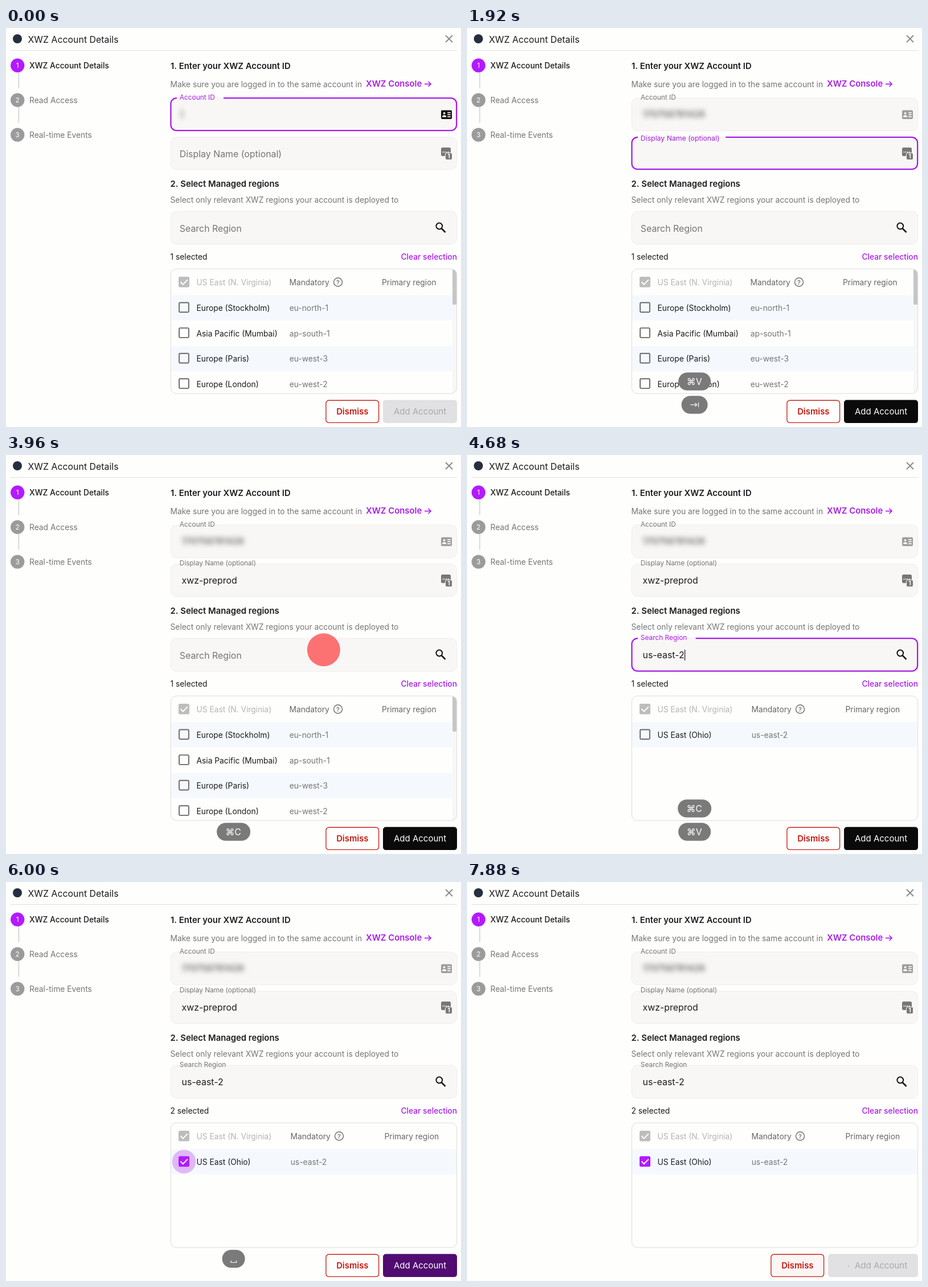
Recreate the animation shown at these times as an HTML page with a canvas. Size 799 by 701 pixels, loop 7920 ms.

```html
<!DOCTYPE html>
<html lang="en">
<head>
<meta charset="utf-8">
<title>Account details</title>
<style>
html, body { margin: 0; width: 100%; height: 100%; overflow: hidden; background: #fefefd; }
canvas { display: block; }
</style>
</head>
<body>
<canvas id="stage" width="799" height="701"></canvas>
<script>
const ctx = document.getElementById('stage').getContext('2d');
const LOOP = 7920;
const PURPLE = '#a81ce8', VIVID = '#b31aff', INK = '#1b1b1d', GREY = '#757575', FILL = '#f9f7f6';
const SMALL = 11.9, BODY = 13.8, HEAD = 14.85, INPUT = 15.9;

const clamp = v => Math.max(0, Math.min(1, v));
const ramp = (t, from, len) => clamp((t - from) / len);
const ease = p => p * p * (3 - 2 * p);
const within = (t, ...spans) => spans.some(([a, b]) => t >= a && t < b);
const mix = (a, b, p) => 'rgb(' + a.map((v, i) => Math.round(v + (b[i] - v) * p)) + ')';

// y is the middle of the capital letters
function text(str, x, y, size, color, weight = 400, align = 'left') {
  ctx.font = `${weight} ${size}px Inter, "DejaVu Sans", sans-serif`;
  ctx.textAlign = align;
  ctx.fillStyle = color;
  ctx.fillText(str, x, y + size * 0.364);
}

function box(x, y, w, h, r, fill, stroke, lw = 1) {
  ctx.beginPath();
  ctx.roundRect(x, y, w, h, r);
  if (fill) { ctx.fillStyle = fill; ctx.fill(); }
  if (stroke) { ctx.strokeStyle = stroke; ctx.lineWidth = lw; ctx.stroke(); }
}

function disc(x, y, r, fill) {
  ctx.beginPath();
  ctx.arc(x, y, r, 0, Math.PI * 2);
  ctx.fillStyle = fill;
  ctx.fill();
}

function line(color, lw, ...pts) {
  ctx.beginPath();
  pts.forEach(([x, y]) => ctx.lineTo(x, y));
  ctx.strokeStyle = color;
  ctx.lineWidth = lw;
  ctx.stroke();
}

function header() {
  disc(20, 19, 8, '#252f3e');
  text('XWZ Account Details', 38.5, 20, INPUT, INK);
  line('#8c8c8c', 1.9, [772, 13], [784, 25]);
  line('#8c8c8c', 1.9, [784, 13], [772, 25]);
  line('#e0e0e0', 1, [8, 39.5], [792, 39.5]);
}

function steps() {
  ['XWZ Account Details', 'Read Access', 'Real-time Events'].forEach((name, i) => {
    const y = 65.8 + i * 60.9;
    disc(20.2, y, 12.2, i ? '#9b9b9b' : VIVID);
    text(i + 1, 20.2, y, SMALL, '#fff', 400, 'center');
    text(name, 41, y + 0.2, BODY, i ? GREY : INK, i ? 400 : 500);
    if (i < 2) line('#bdbdbd', 1, [22.5, y + 12], [22.5, y + 40]);
  });
}

function headings() {
  text('1. Enter your XWZ Account ID', 289, 67, HEAD, INK, 600);
  text('Make sure you are logged in to the same account in', 288.5, 98.5, BODY, GREY);
  text('XWZ Console', 632, 98, HEAD, PURPLE, 600);
  line(PURPLE, 1.7, [735, 98.5], [746, 98.5]);
  line(PURPLE, 1.7, [741.5, 94], [746, 98.5], [741.5, 103]);
  text('2. Select Managed regions', 288.5, 273.5, HEAD, INK, 600);
  text('Select only relevant XWZ regions your account is deployed to', 288.5, 302, BODY, GREY);
}

function field(y, h, label, shrink, value, edge, lw, labelColor) {
  box(289.2, y + 0.5, 502.4, h - 1, 10, FILL, '#efedec');
  ctx.font = `400 ${SMALL}px Inter, sans-serif`;
  const gapEnd = 305 + ctx.measureText(label).width + 15;
  if (edge) {
    const l = 288.3 + lw / 2, r = 792.3 - lw / 2, top = y + 0.6, bot = y + h + 0.3 - lw / 2, c = 10;
    ctx.beginPath();
    ctx.moveTo(gapEnd, top);
    ctx.arcTo(r, top, r, bot, c);
    ctx.arcTo(r, bot, l, bot, c);
    ctx.arcTo(l, bot, l, top, c);
    ctx.arcTo(l, top, gapEnd, top, c);
    ctx.lineTo(300, top);
    ctx.strokeStyle = edge;
    ctx.lineWidth = lw;
    ctx.stroke();
  }
  const rest = y + h / 2 + 1;
  text(label, 304.8, rest + (y - 1.3 - rest) * shrink, INPUT + (SMALL - INPUT) * shrink, labelColor);
  if (value) text(value, 308.5, y + h / 2 + 0.5, INPUT, INK);
}

const caret = (x, y) => { ctx.fillStyle = INK; ctx.fillRect(x, y, 1.2, 19); };

function idIcon(color) {
  box(764, 144.5, 19, 15.5, 2, color);
  disc(769.6, 149.8, 1.9, '#fff');
  box(766, 153.2, 7.2, 3.2, [3, 3, 0, 0], '#fff');
  ctx.fillStyle = '#fff';
  for (const y of [147.8, 151.4, 155]) ctx.fillRect(775.2, y, 5.6, 1.7);
}

function nameIcon() {
  box(764, 210, 17, 15, 2.5, '#777');
  for (let i = 0; i < 4; i++) disc(767.5 + i * 3.2, 218, 1, '#fff');
  box(771.5, 219.5, 12, 12, 2.5, '#777', FILL);
  text('1', 777.6, 225.6, 10, '#fff', 700, 'center');
}

function loupe() {
  ctx.beginPath();
  ctx.arc(760.8, 348, 5.4, 0, Math.PI * 2);
  ctx.strokeStyle = '#111';
  ctx.lineWidth = 2;
  ctx.stroke();
  line('#111', 2.5, [764.6, 352], [771.5, 359]);
}

function secretId(t) {
  ctx.save();
  ctx.filter = 'blur(4px)';
  if (t >= 760) text('170758781426', 308.5, 151, INPUT, '#555', 500);
  ctx.fillStyle = '#777';
  if (within(t, [0, 120], [480, 760])) ctx.fillRect(308, 143, 2, 16);
  if (within(t, [760, 1120], [1440, 1760])) ctx.fillRect(418, 143, 2, 16);
  ctx.restore();
}

function fields(t) {
  const onId = t < 1760, onName = within(t, [1760, 3280]), onSearch = within(t, [4040, 4800]);
  field(122.5, 58.5, 'Account ID', 1, '', onId && PURPLE, 2.3, onId ? PURPLE : GREY);
  secretId(t);
  idIcon(onId ? '#111' : '#9d9d9d');

  field(191.3, 57.7, 'Display Name (optional)', ease(ramp(t, 1760, 200)),
    t >= 2560 && 'xwz-preprod', onName && PURPLE, 2.3, onName ? PURPLE : GREY);
  if (within(t, [1960, 2440])) caret(308.5, 211);
  if (within(t, [2560, 2920])) caret(405, 211);
  nameIcon();

  const hover = within(t, [4800, 5760]);
  field(321.5, 59, 'Search Region', ease(ramp(t, 4040, 200)), t >= 4680 && 'us-east-2',
    onSearch ? PURPLE : hover && '#1b1b1d', onSearch ? 2.3 : 1.3, onSearch ? PURPLE : GREY);
  if (within(t, [4160, 4480])) caret(308.5, 342);
  if (within(t, [4680, 4800])) caret(382, 342);
  loupe();
}

function checkbox(y, fill) {
  if (!fill) return box(304.1, y - 8.4, 16.8, 16.8, 1.5, null, '#686868', 1.9);
  box(303, y - 9.2, 19, 18.6, 2.5, fill);
  line('#fff', 2, [306.5, y], [310.8, y + 4.4], [318.8, y - 3.8]);
}

function ripple(t) {
  if (!within(t, [4800, 6880])) return;
  const grow = ease(ramp(t, 4800, 160));
  const pulse = (1 - Math.cos((t - 4960) / 2500 * Math.PI * 2)) / 2;
  const alpha = (0.38 - 0.09 * ramp(t, 5080, 320)) * (1 - ramp(t, 6800, 80));
  disc(312.5, 491.3, (22.3 - 1.6 * (t > 4960 ? pulse : 0)) * grow, `rgba(168,28,232,${alpha})`);
}

const REGIONS = [
  ['Europe (Stockholm)', 'eu-north-1'],
  ['Asia Pacific (Mumbai)', 'ap-south-1'],
  ['Europe (Paris)', 'eu-west-3'],
  ['Europe (London)', 'eu-west-2'],
];

function table(t) {
  const filtered = t >= 4680, picked = t >= 4880;
  const right = filtered ? 792 : 784, col = filtered ? 500 : 498;
  text(picked ? '2 selected' : '1 selected', 288.5, 401.5, BODY, INK);
  text('Clear selection', 792, 401.5, BODY, PURPLE, 500, 'right');

  ctx.save();
  ctx.beginPath();
  ctx.roundRect(289, 423, 503, 219.5, 10);
  ctx.clip();
  checkbox(446.2, '#bdbdbd');
  text('US East (N. Virginia)', 334.5, 447, BODY, '#b4b4b4');
  text('Mandatory', col - 0.5, 447, BODY, '#666');
  ctx.beginPath();
  ctx.arc(col + 85, 446.5, 7.5, 0, Math.PI * 2);
  ctx.strokeStyle = '#6c6c6c';
  ctx.lineWidth = 1.4;
  ctx.stroke();
  text('?', col + 85, 446.5, 11, '#666', 500, 'center');
  text('Primary region', filtered ? 664.5 : 660, 447, BODY, '#666');

  const rows = filtered ? [['US East (Ohio)', 'us-east-2']] : REGIONS;
  rows.forEach(([name, code], i) => {
    const y = 491.5 + i * 44.6;
    if (i % 2 === 0) {
      ctx.fillStyle = '#f5f9fd';
      ctx.fillRect(289, y - 22, right - 289, 44);
    }
    if (filtered) ripple(t);
    checkbox(y - 0.6, picked && VIVID);
    text(name, 334.5, y + 0.5, BODY, INK);
    text(code, col - 0.3, y + 0.5, BODY, GREY);
  });
  if (!filtered) {
    ctx.fillStyle = '#f7f7f7';
    ctx.fillRect(784, 423, 8, 220);
    box(784, 424, 7.5, 62, 2, '#c6c6c6');
  }
  ctx.restore();
  box(289.3, 423.3, 502.3, 218.9, 10, null, '#dcdcdc');
}

function buttons(t) {
  const busy = t >= 7160, shift = busy ? 28 : 0;
  const tint = busy ? 0.035 * ramp(t, 7300, 200) : 0;
  box(561.9 - shift, 654.3, 92.7, 39.1, 5, `rgba(160,20,10,${tint})`, '#c9251a', 1.4);
  text('Dismiss', 608.3 - shift, 674, HEAD, '#c41a10', 600, 'center');

  const off = [225, 225, 227], black = [10, 10, 11], hover = [82, 12, 115];
  let bg = mix(off, black, ease(ramp(t, 760, 160)));
  let fg = mix([169, 169, 172], [255, 255, 255], ease(ramp(t, 760, 160)));
  if (t >= 5760) bg = mix(black, hover, ease(ramp(t, 5800, 220)));
  if (busy) {
    bg = mix(hover, off, ease(ramp(t, 7160, 240)));
    fg = 'rgb(169,169,172)';
  }
  box(662 - shift, 653.6, 130 + shift, 40.5, 5, bg);
  text('Add Account', 681, 674, 15, fg, 400);
  if (busy) {
    const a = (t - 7880) / 1400 * Math.PI * 2 + 0.1;
    disc(663 + 7.3 * Math.cos(a), 674 + 7.3 * Math.sin(a), 0.9, '#a9a9ac');
  }
}

// Key badges: glyph, width, start, end
const KEYS = [
  ['⌘V', 57, 760, 2000],
  ['tab', 46, 1760, 2440],
  ['⌘V', 57, 2560, 3280],
  ['⌘C', 59, 3480, 4720],
  ['⌘V', 57, 4680, 4880],
  ['tab', 46, 4800, 5520],
  ['space', 40, 4920, 6960],
];

function badges(t) {
  KEYS.filter(k => within(t, [k[2], k[3]])).reverse().forEach(([key, w], i) => {
    const y = 662 - i * 41;
    box(399.6 - w / 2, y - 15.8, w, 31.6, 15.8, '#7a7a7a');
    if (key === 'tab') {
      line('#fff', 1.2, [392.5, y], [403.5, y]);
      line('#fff', 1.2, [400.5, y - 3], [403.5, y], [400.5, y + 3]);
      line('#fff', 1.2, [406.5, y - 4], [406.5, y + 4]);
    } else if (key === 'space') {
      line('#fff', 1.2, [395, y + 3], [395, y + 6.5], [404.5, y + 6.5], [404.5, y + 3]);
    } else {
      text(key, 399.2, y + 0.5, INPUT, '#fff', 400, 'center');
    }
  });
}

function click(t, start, x, y) {
  if (!within(t, [start, start + 400])) return;
  const fade = ease(ramp(t, start + 120, 280));
  disc(x, y, 29, `rgba(255,28,28,${0.6 * (1 - fade)})`);
}

function draw(t) {
  ctx.fillStyle = '#fefefd';
  ctx.fillRect(0, 0, 799, 701);
  header();
  steps();
  headings();
  fields(t);
  table(t);
  buttons(t);
  badges(t);
  click(t, 3960, 557.8, 342.3);
  click(t, 6800, 727, 676);
}

const begin = performance.now();
function tick() {
  draw((performance.now() - begin) % LOOP);
  requestAnimationFrame(tick);
}
tick();
</script>
</body>
</html>
```
